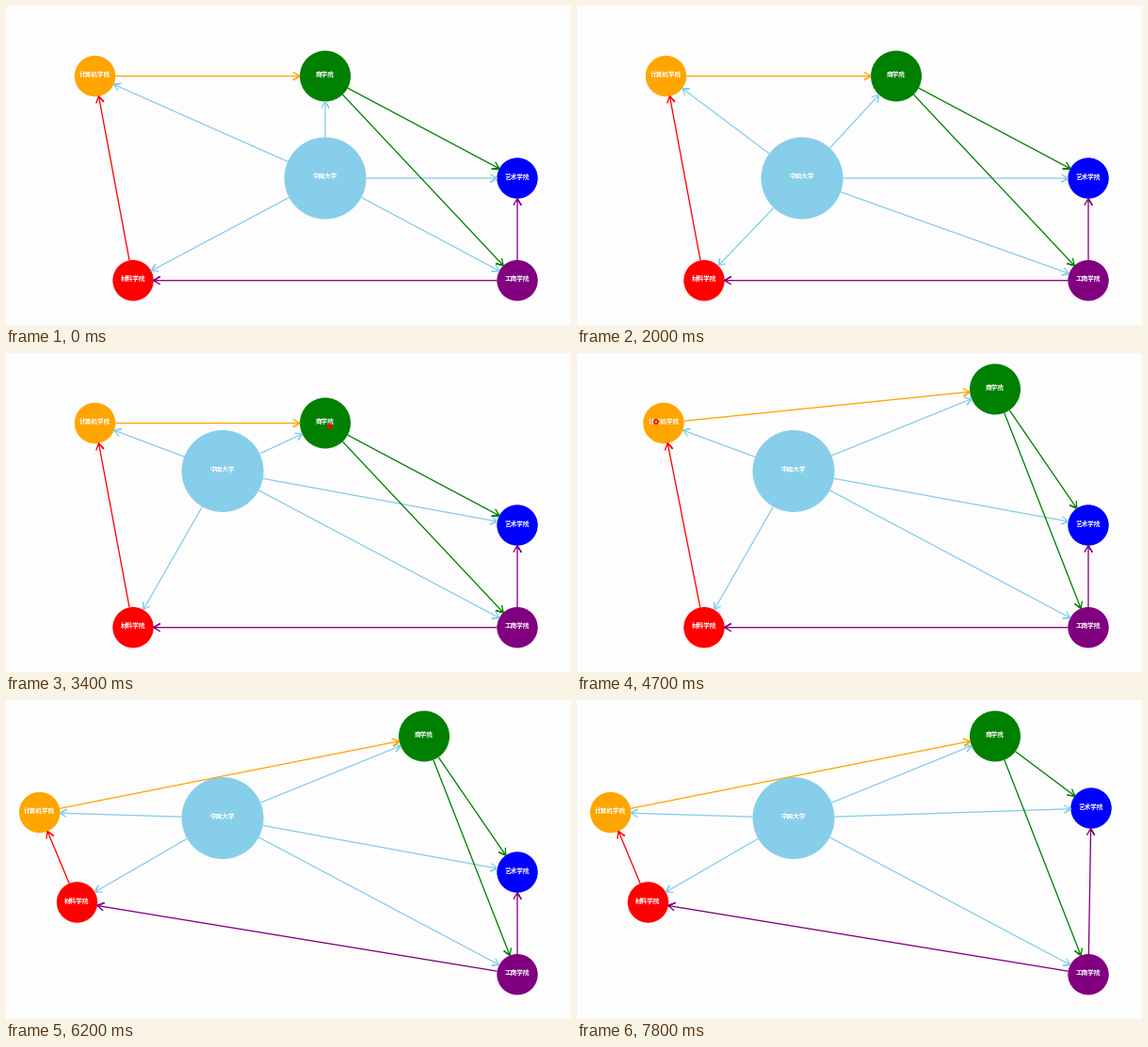
Recreate the animation shown at these times as a matplotlib script. Size 600 px wide and 339 px high, loop 8 s.

```python
import numpy as np
import matplotlib.pyplot as plt
from matplotlib.animation import FuncAnimation
from matplotlib.patches import Circle

W, H, DPI = 600, 339, 100
STEP, LOOP = 100, 8000
PX = 72 / DPI

# name: (label, colour, radius, [(ms, x, y), ...])
NODES = {
    "uni": ("中国大学", "skyblue", 43.5, [
        (800, 339, 183), (1000, 327, 181), (1200, 304, 174.5), (1400, 278, 124),
        (1550, 258, 190), (1700, 246, 240), (1850, 243, 215), (2000, 239, 183),
        (2150, 226, 130), (2400, 196, 250), (2600, 200, 170),
        (2800, 216, 140), (3000, 230, 125.5)]),
    "biz": ("商学院", "green", 27, [
        (3400, 339, 74.5), (3800, 438, 35.5), (4000, 444, 38.5)]),
    "comp": ("计算机学院", "orange", 21.7, [
        (4600, 94.5, 74.5), (4700, 92, 74.5), (5200, 35.7, 119.5)]),
    "mat": ("材料学院", "red", 21.7, [
        (5600, 135, 291.7), (5700, 133, 290), (6200, 75.5, 215)]),
    "art": ("艺术学院", "blue", 21.7, [
        (6700, 543, 183), (6900, 543, 172), (7500, 545, 77),
        (7600, 545, 76), (7700, 546, 92), (7800, 546, 115)]),
    "trade": ("工商学院", "purple", 21.7, [(0, 543, 291.7)]),
}

LINKS = [
    ("uni", "comp"), ("uni", "biz"), ("uni", "art"), ("uni", "trade"), ("uni", "mat"),
    ("comp", "biz"), ("mat", "comp"), ("biz", "art"), ("biz", "trade"),
    ("trade", "mat"), ("trade", "art"),
]

# mouse presses: (ms, x, y)
PRESSES = [(900, 336, 177), (3400, 344, 78), (4700, 84, 73),
           (5700, 128, 288), (6800, 538, 178)]
RING_LIFE = 400

fig = plt.figure(figsize=(W / DPI, H / DPI), dpi=DPI, facecolor="#fdfdfd")
ax = fig.add_axes([0, 0, 1, 1])
ax.set_xlim(0, W)
ax.set_ylim(H, 0)
ax.axis("off")

discs, labels, lines = {}, {}, {}
for name, (label, color, radius, _) in NODES.items():
    discs[name] = ax.add_patch(Circle((0, 0), radius, fc=color, ec="none", zorder=1))
    labels[name] = ax.text(0, 0, label, color="white", fontsize=6.6 * PX,
                           family="Noto Sans CJK JP", weight="bold",
                           ha="center", va="center", zorder=3)
for a, b in LINKS:
    lines[a, b], = ax.plot([], [], color=NODES[a][1], lw=1.3 * PX, zorder=2,
                           solid_capstyle="butt", solid_joinstyle="miter")
ring = ax.add_patch(Circle((0, 0), 1, fill=False, ec="red", zorder=4))


def position(name, t):
    ms, xs, ys = zip(*NODES[name][3])
    return np.array([np.interp(t, ms, xs), np.interp(t, ms, ys)])


def arrow(p, q, rp, rq, head=7, half=4.2):
    """Edge-to-edge line ending in an open arrowhead."""
    u = (q - p) / np.hypot(*(q - p))
    n = np.array([-u[1], u[0]])
    start, tip = p + u * rp, q - u * rq
    left, right = tip - u * head + n * half, tip - u * head - n * half
    return np.array([start, tip, left, tip, right]).T


def draw_ring(t):
    ring.set_visible(False)
    for t0, x, y in PRESSES:
        age = t - t0
        if 0 <= age < RING_LIFE:
            ring.set_visible(True)
            ring.center = (x, y)
            ring.set_radius(2 + 11 * age / 300)
            ring.set_alpha(1 - 0.6 * age / 300)
            ring.set_linewidth((2 if age == 0 else 1.3) * PX)
            ring.set_linestyle("-" if age == 0 else (0, (1.2, 1.2)))


def update(frame):
    t = frame * STEP
    pos = {name: position(name, t) for name in NODES}
    for name, (x, y) in pos.items():
        discs[name].center = (x, y)
        labels[name].set_position((x, y - 2))
    for (a, b), line in lines.items():
        line.set_data(*arrow(pos[a], pos[b], NODES[a][2], NODES[b][2]))
    draw_ring(t)
    return [*discs.values(), *labels.values(), *lines.values(), ring]


anim = FuncAnimation(fig, update, frames=LOOP // STEP, interval=STEP,
                     repeat=True, repeat_delay=0, blit=False)
plt.show()
```
